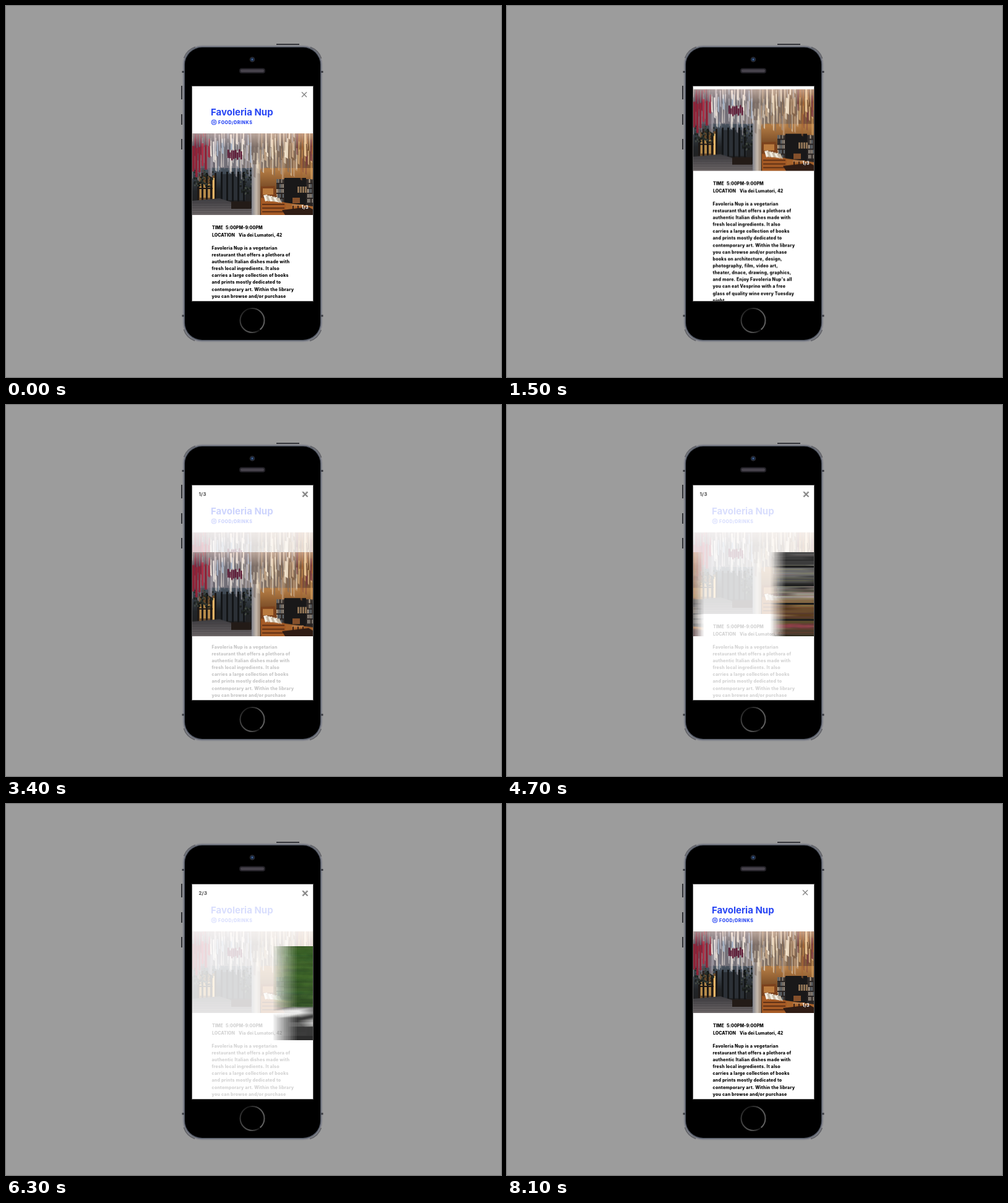
An HTML page with a canvas for the animation above (10000 ms loop, 800x600 px).

```html
<!DOCTYPE html>
<html lang="en">
<head>
<meta charset="utf-8">
<title>Place detail and gallery</title>
<style>
html, body { margin: 0; width: 100%; height: 100%; overflow: hidden; background: #9c9c9c; }
canvas { display: block; }
</style>
</head>
<body>
<canvas id="stage" width="800" height="600"></canvas>
<script>
const ctx = document.getElementById('stage').getContext('2d');
const BLUE = '#2846f4', W = 195, H = 347, LEFT = 301, TOP = 130;
const LINES = `Favoleria Nup is a vegetarian
restaurant that offers a plethora of
authentic Italian dishes made with
fresh local ingredients. It also
carries a large collection of books
and prints mostly dedicated to
contemporary art. Within the library
you can browse and/or purchase
books on architecture, design,
photography, film, video art,
theater, dnace, drawing, graphics,
and more. Enjoy Favoleria Nup's all
you can eat Vesprino with a free
glass of quality wine every Tuesday
night.`.split('\n');

function layer(w, h, draw) {
  const c = document.createElement('canvas');
  c.width = w;
  c.height = h;
  const g = c.getContext('2d');
  if (draw) draw(g);
  return c;
}

function rect(g, color, x, y, w, h) {
  g.fillStyle = color;
  g.fillRect(x, y, w, h);
}

function round(g, color, x, y, w, h, r) {
  g.fillStyle = color;
  g.beginPath();
  g.roundRect(x, y, w, h, r);
  g.fill();
}

function poly(g, color, ...p) {
  g.fillStyle = color;
  g.beginPath();
  for (let i = 0; i < p.length; i += 2) g.lineTo(p[i], p[i + 1]);
  g.fill();
}

function arc(g, color, width, x, y, r, from = 0, to = 2 * Math.PI) {
  g.strokeStyle = color;
  g.lineWidth = width;
  g.beginPath();
  g.arc(x, y, r, from, to);
  g.stroke();
}

function dot(g, color, x, y, r) {
  g.fillStyle = color;
  g.beginPath();
  g.arc(x, y, r, 0, 2 * Math.PI);
  g.fill();
}

function text(g, s, x, y, size = 7, color = '#000', spacing = 0.05, weight = 800) {
  g.font = `${weight} ${size}px Inter, sans-serif`;
  g.letterSpacing = spacing + 'px';
  g.fillStyle = color;
  g.fillText(s, x, y);
}

function cross(g, color, width, x, y, r) {
  g.strokeStyle = color;
  g.lineWidth = width;
  g.beginPath();
  g.moveTo(x - r, y - r);
  g.lineTo(x + r, y + r);
  g.moveTo(x + r, y - r);
  g.lineTo(x - r, y + r);
  g.stroke();
}

function shade(g, x0, y0, x1, y1, ...colors) {
  const s = g.createLinearGradient(x0, y0, x1, y1);
  colors.forEach((c, i) => s.addColorStop(i / (colors.length - 1), c));
  return s;
}

function random(seed) {
  return () => (seed = (seed * 16807) % 2147483647) / 2147483647;
}

// Courtyard with hanging ribbons
const courtyard = layer(W, 132, g => {
  const rnd = random(77), pick = list => list[Math.floor(rnd() * list.length)];
  rect(g, shade(g, 0, 0, W, 0, '#5b5460', '#77757c', '#8a745f', '#7c5231'), 0, 0, W, 80);
  rect(g, shade(g, 0, 55, 0, 132, '#48535f', '#222528', '#1f1c1b'), 0, 56, 112, 76);
  rect(g, shade(g, 0, 60, 0, 132, '#b17a43', '#6b401f', '#2e1c12'), 108, 56, 87, 76);
  // Glass doors and floor
  rect(g, '#6b4c2b', 9, 68, 28, 42);
  rect(g, '#b58a4a', 12, 82, 19, 22);
  for (let x = 8; x < 40; x += 7) rect(g, '#1e1916', x, 64, 3, 48);
  rect(g, '#1e1916', 8, 88, 28, 2);
  rect(g, '#e3b468', 33, 72, 3, 34);
  rect(g, '#2b3036', 46, 66, 40, 42);
  for (let x = 46; x < 90; x += 9) rect(g, '#131517', x, 62, 3, 50);
  poly(g, shade(g, 0, 106, 0, 132, '#3d3c40', '#6d6768'), 0, 109, 44, 105, 97, 122, 97, 132, 0, 132);
  for (let y = 112; y < 132; y += 4) rect(g, '#35323455', 0, y, 97, 1);
  rect(g, '#231b17', 63, 110, 32, 12);
  // Plants
  for (let i = 0; i < 150; i++) {
    const right = i % 3 == 0;
    dot(g, pick(['#161b18', '#272f29', '#434a42', '#1c1f1d']),
      (right ? 78 : 3) + rnd() * (right ? 18 : 30), 60 + rnd() * (right ? 40 : 26), 0.6 + rnd() * 1.4);
  }
  // Book room
  rect(g, '#2a2524', 136, 74, 59, 48);
  for (let y = 74; y < 112; y += 8) {
    for (let x = 136; x < 194; x += 2.5) {
      if (x < 147 || x > 184) rect(g, pick(['#8d8378', '#5d646a', '#b3a08a', '#39322e']), x, y, 2, 6);
    }
  }
  rect(g, '#191819', 149, 72, 35, 48);
  for (let x = 170; x < 183; x += 4) rect(g, '#8f7355', x, 86, 3, 10);
  poly(g, '#a8632b', 111, 126, 150, 112, 195, 118, 195, 132, 111, 132);
  poly(g, '#7c421d', 111, 86, 133, 85, 137, 103, 112, 105);
  rect(g, '#b97a3e', 114, 89, 17, 10);
  poly(g, '#a55a25', 111, 104, 151, 112, 151, 132, 111, 132);
  for (let y = 114; y < 132; y += 6) rect(g, '#4b2512', 113, y, 36, 1.5);
  for (let i = 0; i < 6; i++) poly(g, i % 2 ? '#c9bba6' : '#f4eee2', 115 + i * 4, 100 + i, 121 + i * 4, 99 + i, 125 + i * 4, 108 + i, 118 + i * 4, 110);
  rect(g, '#85502b', 162, 104, 12, 9);
  rect(g, '#b57a48', 161, 115, 19, 3);
  for (const x of [162, 170, 178]) rect(g, '#3b2216', x, 117, 2, 12);
  poly(g, '#2f1c14', 145, 124, 188, 119, 195, 123, 195, 132, 150, 132);
  rect(g, shade(g, 96, 0, 111, 0, '#82838b', '#c4b8ac', '#8f7863'), 96, 50, 14, 82);
  // Ribbons, back row first
  for (let row = 3; row >= 0; row--) {
    for (let x = -1; x < W; x += 2.2 + rnd() * 3.6) {
      const y = row * 14 - 8 + rnd() * 10, len = 14 + rnd() * 25, w = 0.9 + rnd() * 2.4;
      const colors = x < 27 ? ['#a82e43', '#e3d2d2', '#74263d', '#8b7c86']
        : x < 96 ? ['#e9e2de', '#b9b4bd', '#f3e9df', '#73717c', '#a9b7cb']
        : x < 168 ? ['#f0dfc5', '#c9a988', '#a59a94', '#f7e8d0', '#7b6d66']
        : ['#dba867', '#f0cb98', '#a46636', '#74303f'];
      g.globalAlpha = row > 1 ? 0.6 : 0.9;
      poly(g, pick(colors), x, y, x + w, y, x + w + rnd() * 2 - 1, y + len, x + rnd() * 2 - 1, y + len - 2);
    }
  }
  g.globalAlpha = 1;
  for (let x = 0; x < 25; x += 5) {
    rect(g, pick(['#8f2337', '#a93046', '#7b1d30']), x, 12 + rnd() * 12, 3.5, 36 + rnd() * 12);
  }
  for (let x = 57; x < 80; x += 3) rect(g, '#5d1a36', x, 25 + rnd() * 6, 2.4, 9 + rnd() * 8);
  rect(g, shade(g, 0, 0, 0, 22, '#ffe2d577', '#ffe2d500'), 0, 0, W, 22);
});

// Shelves of stacked books
const shelves = layer(W, 136, g => {
  const rnd = random(412);
  rect(g, shade(g, 0, 0, 0, 136, '#4a4948', '#303030', '#77736d', '#272625', '#8d8371',
    '#76542f', '#4c321d', '#604036', '#29201c'), 0, 0, W, 136);
  for (let y = 3; y < 132; y += 3 + rnd() * 5) {
    for (let x = -8; x < W; ) {
      const w = 25 + rnd() * 60, light = y < 75 ? 20 + rnd() * 155 : 20 + rnd() * 100;
      g.globalAlpha = 0.55;
      rect(g, y < 75 ? `rgb(${light},${light},${light - 4})` : `rgb(${light + 28},${light + 4},${light * 0.6})`,
        x, y, w, 2 + rnd() * 3);
      x += w + 2;
    }
  }
  g.globalAlpha = 0.65;
  for (let x = 5; x < W; x += 16) rect(g, '#a22e56', x, 111 + rnd() * 7, 7 + rnd() * 7, 6);
  g.globalAlpha = 1;
  for (const y of [22, 52, 82, 108]) rect(g, '#171615', 0, y, W, 3);
});

// Garden terrace
const garden = layer(W, 152, g => {
  const rnd = random(930);
  rect(g, shade(g, 0, 0, 0, 152, '#294a1d', '#335f24', '#263a20', '#292a25'), 0, 0, W, 152);
  for (let i = 0; i < 850; i++) {
    const v = rnd();
    dot(g, `rgba(${20 + v * 70},${45 + v * 90},${12 + v * 40},.75)`, rnd() * W, rnd() * 100, 1 + rnd() * 3);
  }
  rect(g, '#383b34', 0, 99, W, 53);
  for (let i = 0; i < 5; i++) {
    const x = 4 + i * 43, y = 106 + (i % 2) * 15;
    poly(g, '#d7d8d4', x - 8, y, x + 29, y - 8, x + 43, y + 2, x + 4, y + 10);
    poly(g, '#f0f0eb', x - 6, y - 1, x + 29, y - 9, x + 39, y - 4, x + 2, y + 5);
    rect(g, '#171a18', x + 7, y + 9, 3, 24);
    rect(g, '#8f9188', x + 21, y + 17, 18, 7);
  }
  rect(g, '#20231f', 0, 145, W, 7);
});

// Page in stage coordinates at scroll zero
const page = layer(W, 520, g => {
  g.translate(-LEFT, -TOP);
  rect(g, '#fff', LEFT, TOP, W, 520);
  cross(g, '#878787', 1.4, 482, 143.3, 4);
  text(g, 'Favoleria Nup', 331, 176.7, 15, BLUE, 0, 700);
  arc(g, BLUE, 1, 336, 188, 4);
  rect(g, BLUE, 334.2, 185.6, 1.2, 4.6);
  rect(g, BLUE, 336.7, 185.6, 1.2, 4.6);
  text(g, 'FOOD/DRINKS', 343, 190.7, 7, BLUE, 0.55);
  g.drawImage(courtyard, LEFT, 206);
  text(g, '1/3', 477.5, 327.8, 7, '#fff', 0.3);
  text(g, 'TIME', 333, 361);
  text(g, '5:00PM-9:00PM', 355, 361);
  text(g, 'LOCATION', 333, 372.7);
  text(g, 'Via dei Lumatori, 42', 376, 372.7);
  LINES.forEach((s, i) => text(g, s, 332.5, 393.6 + i * 11.15, 7, '#000', 0.22));
  g.strokeStyle = BLUE;
  g.lineWidth = 1.8;
  g.strokeRect(333, 574.5, 132, 30);
  text(g, 'SAVE', 381.5, 593.2, 11, BLUE, 1.1, 700);
});

const phone = layer(800, 600, g => {
  rect(g, '#9c9c9c', 0, 0, 800, 600);
  for (const [y, h] of [[129, 22], [175, 17], [215, 17]]) rect(g, '#303136', 283, y, 2, h);
  rect(g, '#35363b', 437, 61, 37, 2);
  round(g, '#8a8b92', 285.5, 63.5, 226, 480, 31);
  for (const y of [105, 499.5]) rect(g, '#393a40', 284.5, y, 228, 3);
  const q = Math.PI / 2;
  [[482, 514], [315, 514], [315, 94], [482, 94]].forEach(([x, y], i) =>
    arc(g, '#65666b', 2, x, y, 29, q * i + 0.35, q * i + 1.25));
  round(g, '#565c68', 287.5, 65.5, 222, 476, 29);
  round(g, '#000', 289, 67, 219, 473, 28);
  dot(g, '#29292f', 398, 86.5, 4.3);
  dot(g, '#172c4d', 398, 86.5, 2.8);
  dot(g, '#526f9b', 398, 86.5, 1.2);
  round(g, '#232127', 377, 100.5, 42, 8.5, 4);
  round(g, '#47434c', 379, 102.5, 38, 4.5, 2);
  const ring = g.createConicGradient(0.85, 398, 508.5);
  ['#0c0c0c', '#555', '#444', '#2c2c2c', '#1a1a1a', '#555', '#5c5c5c', '#666'].forEach((c, i) => ring.addColorStop(i / 7, c));
  arc(g, ring, 2, 398, 508.5, 19.5);
  g.strokeStyle = '#555';
  g.lineWidth = 1;
  g.strokeRect(LEFT - 0.5, TOP - 0.5, W + 1, H + 1);
});

const clamp = v => Math.max(0, Math.min(1, v));

// Smooth start and stop; a larger bias moves the fast part earlier.
function ease(t, from, to, bias = 1) {
  const v = 1 - (1 - clamp((t - from) / (to - from))) ** bias;
  return v * v * (3 - 2 * v);
}

const sample = layer(W, H), blurred = layer(W, H);
const sg = sample.getContext('2d'), bg = blurred.getContext('2d');

// The white veil rises first, the gallery follows it.
function drawGallery(t) {
  const leave = ease(t, 7500, 8100);
  const veil = H * (1 - ease(t, 2300, 3400) + leave);
  const rise = H * (1 - ease(t, 2700, 3400) + leave);
  const x = -327 * ease(t, 4200, 5400, 1.5) - 400 * ease(t, 5900, 6700, 1.27);
  sg.setTransform(1, 0, 0, 1, 0, 0);
  sg.clearRect(0, 0, W, H);
  rect(sg, 'rgba(255,255,255,.77)', 0, veil, W, H);
  sg.translate(0, rise);
  sg.drawImage(courtyard, x, 108, W, 136);
  sg.drawImage(shelves, x + 327, 108);
  sg.drawImage(garden, x + 727, 100);
  const n = t < 4850 ? 1 : t < 6450 ? 2 : 3;
  text(sg, n + '/3', 10.5, 17.2, 7.5, '#555', 0.3);
  cross(sg, '#858585', 2.2, 182.5, 14.5, 4);
}

// Averages the gallery over an open-shutter interval.
function shootGallery(t, shutter) {
  const count = 15;
  bg.globalCompositeOperation = 'lighter';
  bg.globalAlpha = 1 / count;
  bg.clearRect(0, 0, W, H);
  for (let i = 0; i < count; i++) {
    drawGallery(t + shutter * (i / (count - 1) - 0.5));
    bg.drawImage(sample, 0, 0);
  }
  ctx.drawImage(blurred, LEFT, TOP);
}

// Start, end and shutter time of each gallery move
const MOVES = [[2300, 3400, 90], [4200, 5400, 50], [5900, 6700, 50], [7500, 8100, 90]];

function draw(t) {
  const scroll = 155 * (ease(t, 0, 1100, 1.96) - ease(t, 1200, 2000, 1.59));
  ctx.drawImage(phone, 0, 0);
  ctx.save();
  ctx.beginPath();
  ctx.rect(LEFT, TOP, W, H);
  ctx.clip();
  ctx.drawImage(page, LEFT, TOP - scroll);
  if (t > 2300 && t < 8100) {
    const move = MOVES.find(([from, to]) => t > from && t < to);
    if (move) shootGallery(t, move[2]);
    else {
      drawGallery(t);
      ctx.drawImage(sample, LEFT, TOP);
    }
  }
  if (t >= 7100 && t < 7400) dot(ctx, `rgba(120,120,120,${0.3 * Math.sin(Math.PI * (t - 7000) / 400)})`, 478, 150, 10);
  ctx.restore();
}

const start = performance.now();
let last = -1;
function tick() {
  const t = Math.floor((performance.now() - start) % 10000 / 100) * 100;
  if (t != last) draw(last = t);
  requestAnimationFrame(tick);
}
tick();
</script>
</body>
</html>
```
